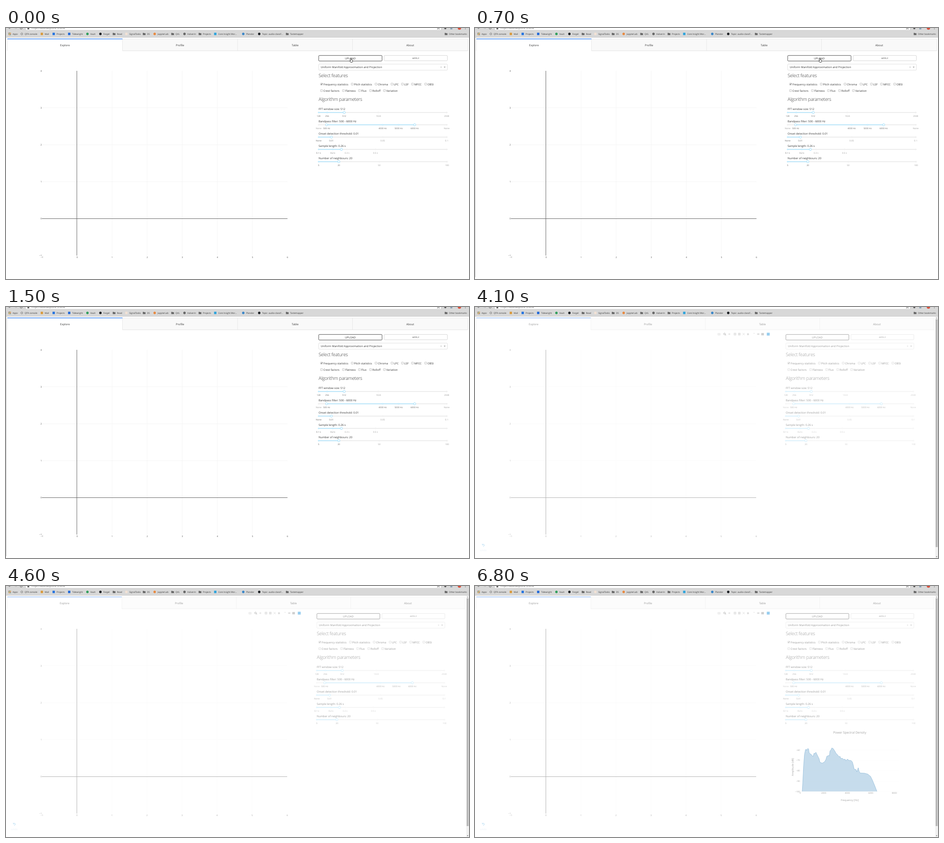
These frames come from a looping animation (1016x551 px, 8 s). An HTML page with a canvas:

```html
<!DOCTYPE html>
<html lang="en">
<head>
<meta charset="utf-8">
<title>Audio explorer</title>
<style>
html, body { margin: 0; width: 100%; height: 100%; overflow: hidden; background: #fff; }
canvas { display: block; width: 1016px; height: 551px; }
</style>
</head>
<body>
<canvas id="stage"></canvas>
<script>
const LOOP = 8000;
const canvas = document.getElementById('stage');
const c = canvas.getContext('2d');
const dpr = window.devicePixelRatio || 1;
canvas.width = 1016 * dpr;
canvas.height = 551 * dpr;

function text(s, x, y, size = 6, color = '#444', align = 'left', weight = 400, spacing = 0) {
  c.font = `${weight} ${size}px "Open Sans", "Noto Sans", sans-serif`;
  c.letterSpacing = spacing + 'px';
  c.textAlign = align;
  c.fillStyle = color;
  c.fillText(s, x, y);
}
function rect(x, y, w, h, color) {
  c.fillStyle = color;
  c.fillRect(x, y, w, h);
}
function dot(x, y, r, fill, stroke, width = 0.8) {
  c.beginPath();
  c.arc(x, y, r, 0, 7);
  if (fill) { c.fillStyle = fill; c.fill(); }
  if (stroke) { c.strokeStyle = stroke; c.lineWidth = width; c.stroke(); }
}
function box(x, y, w, h, r, stroke, width = 0.7, fill = '#fff') {
  c.beginPath();
  c.roundRect(x, y, w, h, r);
  c.fillStyle = fill;
  c.fill();
  c.strokeStyle = stroke;
  c.lineWidth = width;
  c.stroke();
}
function path(pts, stroke, width = 0.7, fill, close) {
  c.beginPath();
  for (let i = 0; i < pts.length; i += 2) c.lineTo(pts[i], pts[i + 1]);
  if (close) c.closePath();
  if (fill) { c.fillStyle = fill; c.fill(); }
  if (stroke) { c.strokeStyle = stroke; c.lineWidth = width; c.stroke(); }
}

// [label, text x, icon kind, icon colour]
const bookmarks = [
  ['Apps', 14.5, 'grid'], ['QTR console', 41, 'ring', '#777'], ['Mail', 85, 'square', '#d99a3c'],
  ['Projects', 111, 'square', '#2373e0'], ['Tidewright', 145, 'square', '#2068d8'],
  ['Vault', 185, 'dot', '#2f9e5b'], ['Forgel', 213.5, 'dot', '#1b1f23'],
  ['Read', 243.5, 'folder'], ['SignalTasks', 270.5, 'square', '#f3e3d6'], ['DS', 309.5, 'folder'],
  ['JupyterLab', 332.5, 'dot', '#e8883e'], ['QVL', 372, 'folder'], ['Halverin', 398, 'dot', '#666'],
  ['Projects', 432, 'folder'], ['Core Insight Wor...', 465.5, 'square', '#2ba3dc'],
  ['Plandor', 527, 'dot', '#3a86c8'], ['Topic: audio-classif...', 562, 'dot', '#1b1f23'],
  ['Tastemapper', 623.5, 'folder'], ['Other bookmarks', 972, 'folder']
];

function icon(kind, x, y, color) {
  if (kind === 'folder') {
    path([x - 3, y - 2.3, x - 0.6, y - 2.3, x + 0.2, y - 1.6, x + 3, y - 1.6, x + 3, y + 2.4, x - 3, y + 2.4], null, 0, '#666');
  } else if (kind === 'grid') {
    const tones = ['#d9534a', '#3c9a5f', '#e0a52e'];
    for (let i = 0; i < 9; i++) rect(x - 2.8 + (i % 3) * 2, y - 2.8 + (i / 3 | 0) * 2, 1.5, 1.5, tones[(i + (i / 3 | 0)) % 3]);
  } else if (kind === 'square') rect(x - 2.6, y - 2.6, 5.2, 5.2, color);
  else if (kind === 'ring') dot(x, y, 2.1, null, color, 1);
  else dot(x, y, 2.7, color);
}

function browser() {
  rect(0, 0, 1016, 20.5, '#d8d8d8');
  box(43, -8, 912, 13, 1.5, '#bbb', 0.6);
  text('https://audioexplorer.online', 56, 2.2, 5.6, '#555');
  rect(47, -1, 4, 4, '#666');
  path([10.5, 0, 6, 0, 8, 2.2], '#555', 0.9);
  path([18.5, 0, 23.5, 0, 21.4, 2.2], '#aaa', 0.9);
  dot(33.3, 0, 2.4, null, '#555', 0.9);
  path([946.5, 3, 948.7, 1.4, 951, 3, 950.2, 0, 947.2, 0], '#555', 0.6, null, true);
  dot(964, 0.5, 2.3, '#555');
  rect(975, -1, 4.5, 4, '#8aa0b5');
  dot(995, 0.2, 3.6, '#d8503c');
  dot(1008, 0.2, 0.6, '#555');
  dot(1008, 2.3, 0.6, '#555');
  for (const [label, x, kind, color] of bookmarks) {
    icon(kind, x - 6.3, 13, color);
    text(label, x, 14.9, 4.8, '#333');
  }
  rect(0, 20, 1016, 0.7, '#bbb');
}

function tabs(right) {
  const w = (right - 3) / 4;
  ['Explore', 'Profile', 'Table', 'About'].forEach((name, i) => {
    const x = 3 + i * w;
    if (i) {
      rect(x, 24, w, 26, '#f9f9f9');
      rect(x, 49.7, w, 0.6, '#d0d0d0');
    }
    rect(x, 23.8, w, 0.5, '#d6d6d6');
    rect(x - 0.25, 24, 0.5, 26, '#d6d6d6');
    text(name, x + w / 2, 39.6, 6, '#333', 'center');
  });
  rect(right - 0.25, 24, 0.5, 26, '#d6d6d6');
  rect(3, 23.4, w, 1.2, '#1975fa');
}

function scatterAxes(x0, step, grid) {
  const y0 = 418.5, dy = 81.15;
  const left = 79, right = x0 + 6 * step;
  for (let i = 1; i < 6; i++) rect(x0 + i * step - 0.3, 94, 0.6, 405.5, grid);
  for (let i = 1; i < 4; i++) rect(left, y0 - i * dy - 0.3, right - left, 0.6, grid);
  rect(Math.floor(x0 - 0.3), 94, 1, 405.5, '#666');
  rect(left, 418, right - left, 1, '#666');
  for (let i = -1; i < 7; i++) text(String(i).replace('-', '−'), x0 + i * step, 504.9, 4.8, '#444', 'center');
  for (let i = -1; i < 5; i++) text(String(i).replace('-', '−'), 78.4, y0 - i * dy + 1.6, 4.8, '#444', 'right');
}

const checks = [
  [123.5, [['Frequency statistics', 692.5], ['Pitch statistics', 759.8], ['Chroma', 812], ['LPC', 847], ['LSF', 870], ['MFCC', 892], ['OBSI', 921]]],
  [137.8, [['Crest factors', 692.5], ['Flatness', 740.5], ['Flux', 775.7], ['Rolloff', 800], ['Variation', 830.5]]]
];

// marks: [label, fraction]
const sliders = [
  { title: 'FFT window size: 512', from: 0, to: 0.2, marks: [['128', 0], ['256', 1 / 15], ['512', 0.2], ['1024', 7 / 15], ['2048', 1]] },
  { title: 'Bandpass filter: 500 - 6000 Hz', from: 1 / 16, to: 0.75, range: true,
    marks: [['None', 0], ['500 Hz', 1 / 16], ['4000 Hz', 0.5], ['5000 Hz', 0.625], ['6000 Hz', 0.75], ['None', 1]] },
  { title: 'Onset detection threshold: 0.01', from: 0, to: 0.1, marks: [['None', 0], ['0.01', 0.1], ['0.05', 0.5], ['0.1', 1]] },
  { title: 'Sample length: 0.26 s', from: 0, to: 0.178, marks: [['0.1 s', 0], ['0.2 s', 1 / 9], ['0.3 s', 2 / 9], ['0.5 s', 4 / 9], ['', 1]] },
  { title: 'Number of neighbours: 20', from: 0, to: 15 / 95, marks: [['5', 0], ['20', 15 / 95], ['50', 45 / 95], ['100', 1.003]] }
];

function slider(s, i, x0, w) {
  const y = 185.5 + 27 * i;
  text(s.title, x0, y - 5.2, 6, '#333');
  box(x0 - 1, y - 0.8, w + 3, 1.6, 0.8, 'transparent', 0, '#e6e6e6');
  rect(x0 + s.from * w, y - 0.8, (s.to - s.from) * w, 1.6, '#abe2fb');
  for (const [label, f] of s.marks) {
    const on = f >= s.from && f <= s.to;
    dot(x0 + f * w, y, 1.2, '#fff', on ? '#96dbfa' : '#e3e3e3');
    text(label, x0 + f * w, y + 9.8, 4.8, on ? '#666' : '#999', 'center');
  }
  for (const f of s.range ? [s.from, s.to] : [s.to]) dot(x0 + f * w, y, 2.4, '#fff', '#80d4fa');
}

function panel(x0, right, w, shift, label) {
  const half = (right - x0 - 4.6) / 2;
  box(x0 + 0.2, 60.3, half, 12.2, 1.6, '#222', 0.8);
  text(label, x0 + half / 2, 68.8, 6, '#333', 'center');
  box(right - half, 60.3, half, 11.6, 1.6, '#bbb', 0.6);
  text('APPLY', right - half / 2 + 0.2, 67.7, 4.4, '#555', 'center', 600, 0.4);

  box(x0 + 0.2, 79.2, right - x0 - 0.2, 13.4, 1.6, '#ccc', 0.6);
  text('Uniform Manifold Approximation and Projection', x0 + 4.4, 87.9, 6, '#333');
  text('×', right - 13.8, 87.6, 6, '#999', 'center');
  path([right - 8, 85, right - 4, 85, right - 6, 87.1], null, 0, '#888', true);

  text('Select features', x0, 108, 10.4, '#333', 'left', 300, -0.32);
  text('Algorithm parameters', x0, 160, 10.4, '#333', 'left', 300, -0.32);

  for (const [y, row] of checks) for (const [name, bx] of row) {
    const x = bx + shift;
    box(x - 2.3, y - 2.6, 4.5, 4.5, 0.6, '#aaa', 0.6, '#f6f6f6');
    text(name, x + 3.9, y + 2.1, 6, '#333');
  }
  const k = 692.5 + shift;
  path([k - 1.4, 123.2, k - 0.3, 124.4, k + 1.6, 121.6], '#333', 0.9);
  sliders.forEach((s, i) => slider(s, i, x0, w));
}

function modebar() {
  const y = 59.5, pale = 'rgba(68,68,68,.35)', dark = 'rgba(68,68,68,.75)';
  box(532.8, y - 1.6, 5.4, 3.8, 0.5, pale, 0.8, '#fff');
  dot(535.5, y + 0.3, 1, pale);
  dot(547.5, y - 0.4, 1.9, null, dark, 1);
  path([549, y + 1, 550.7, y + 2.7], dark, 1.1);
  path([555.5, y, 560.5, y], pale, 0.9);
  path([558, y - 2.5, 558, y + 2.5], pale, 0.9);
  for (const x of [570.5, 580]) {
    rect(x - 2.6, y - 2.6, 5.2, 5.2, pale);
    path([x - 1.6, y, x + 1.6, y], '#fff', 0.8);
  }
  path([570.5, y - 1.6, 570.5, y + 1.6], '#fff', 0.8);
  path([587.2, y - 2.4, 592, y + 2.4], pale, 0.9);
  path([592, y - 2.4, 587.2, y + 2.4], pale, 0.9);
  path([596.3, y, 599, y - 2.5, 601.7, y, 600.9, y, 600.9, y + 2.2, 597.1, y + 2.2, 597.1, y], null, 0, pale, true);
  path([610.5, y - 2, 613.5, y - 2, 612, y - 0.3], pale, 0.6);
  path([618.4, y, 620, y - 1.4, 624, y - 1.4, 624, y + 1.4, 620, y + 1.4], null, 0, pale, true);
  rect(628.2, y - 2, 5.8, 1.7, dark);
  rect(628.2, y + 0.6, 5.8, 1.7, dark);
  rect(640.3, y - 3, 6.4, 6.2, '#2f9be0');
}

function undo() {
  c.beginPath();
  c.arc(18.4, 523, 2.2, -2.5, 2);
  c.strokeStyle = '#5fb4e6';
  c.lineWidth = 0.9;
  c.stroke();
  path([16, 519.8, 16, 522.2, 18.4, 522.2], '#5fb4e6', 0.8);
  text('undo', 18.3, 535.5, 6, '#d5e6f0', 'center');
}

// spectrum outline, x y pairs
const curve = [718, 451, 719, 436, 721, 396, 723, 370, 725, 360, 726.5, 358, 728, 361, 730.5, 356.5, 732, 358, 733.5, 367,
  738, 370, 740, 373, 742, 374, 744, 367, 746, 368, 748, 365, 752, 373, 755, 379, 757, 387, 762, 389, 767, 386,
  770, 381, 772, 374, 776, 372, 777.5, 373, 779, 362, 781, 360, 783, 355.5, 786, 357, 790, 363, 792, 367, 795, 370,
  799, 375, 801, 374, 803, 379, 806, 378, 809, 381, 812, 380, 814, 384, 817, 380, 821, 383, 825, 383, 828, 386,
  830, 393, 832, 402, 836, 403, 838, 408, 841, 399, 843, 407, 845, 410.5, 855, 411, 862, 413, 868, 418, 872, 426, 877, 438, 882, 451];

function spectrum() {
  text('Power Spectral Density', 822.3, 324.2, 6.8, '#444', 'center');
  for (let i = 0; i < 5; i++) {
    const x = 713.5 + 51.7 * i, y = 360 + 22.8 * i;
    rect(713.5, y - 0.2, 217, 0.4, '#f2f2f2');
    text(String(2000 * i), x, 456.4, 4.8, '#444', 'center');
    text('−' + (60 + 10 * i), 713, y + 1.6, 4.8, '#444', 'right');
  }
  path(curve, null, 0, 'rgba(31,119,180,.5)', true);
  path(curve, '#1f77b4', 0.8);
  text('Frequency [Hz]', 822.3, 471.8, 5.6, '#444', 'center');
  c.save();
  c.translate(699, 397.3);
  c.rotate(-Math.PI / 2);
  text('Amplitude [dB]', 0, 0, 5.6, '#444', 'center');
  c.restore();
}

function scrollbar() {
  rect(1010, 21, 6, 530, '#f1f1f1');
  rect(1010.8, 27, 4.4, 500, '#b8b8b8');
  path([1011.5, 25, 1014.5, 25, 1013, 23.4], null, 0, '#777', true);
  path([1011.5, 547.4, 1014.5, 547.4, 1013, 549], null, 0, '#333', true);
}

function hand(x, y) {
  path([x - 1.1, y - 4, x - 0.2, y - 4.6, x + 0.6, y - 4, x + 0.8, y - 1.4, x + 3.2, y - 0.6, x + 3.4, y + 1.6,
    x + 2.5, y + 4.4, x - 1, y + 4.4, x - 3, y + 1, x - 2.6, y + 0.2, x - 1.1, y + 1.2], '#111', 0.8, '#fff', true);
}
function arrow(x, y) {
  path([x, y, x, y + 7.6, x + 1.8, y + 6, x + 3, y + 8.8, x + 4.2, y + 8.3, x + 3, y + 5.6, x + 5.4, y + 5.4], '#fff', 0.6, '#111', true);
}

function draw(t) {
  c.setTransform(dpr, 0, 0, dpr, 0, 0);
  c.textRendering = 'geometricPrecision';
  rect(0, 0, 1016, 551, '#fff');
  const busy = t >= 4100;
  if (busy) {
    tabs(1007.5);
    scatterAxes(155.6, 76.9, '#f4f4f4');
    modebar();
    panel(682, 963, 279.5, -4, 'UPLOAD');
    undo();
    if (t >= 6800) spectrum();
    rect(0, 21, 1016, 530, 'rgba(255,255,255,.5)');
    scrollbar();
  } else {
    tabs(1013.3);
    scatterAxes(156, 76.95, '#eee');
    panel(686, 968.6, 281, 0, t < 3700 ? 'UPLOAD' : '0%');
  }
  browser();
  if (t >= 700 && t < 3700) rect(0, 10, 1, 537, '#c8c8c8');
  if (t < 1300) hand(757.3, 71);
  else if (t < 1400) arrow(506, 65);
  else if (t < 1500) arrow(256, 65);
}

function tick(now) {
  draw(now % LOOP);
  requestAnimationFrame(tick);
}
draw(0);
requestAnimationFrame(tick);
</script>
</body>
</html>
```
